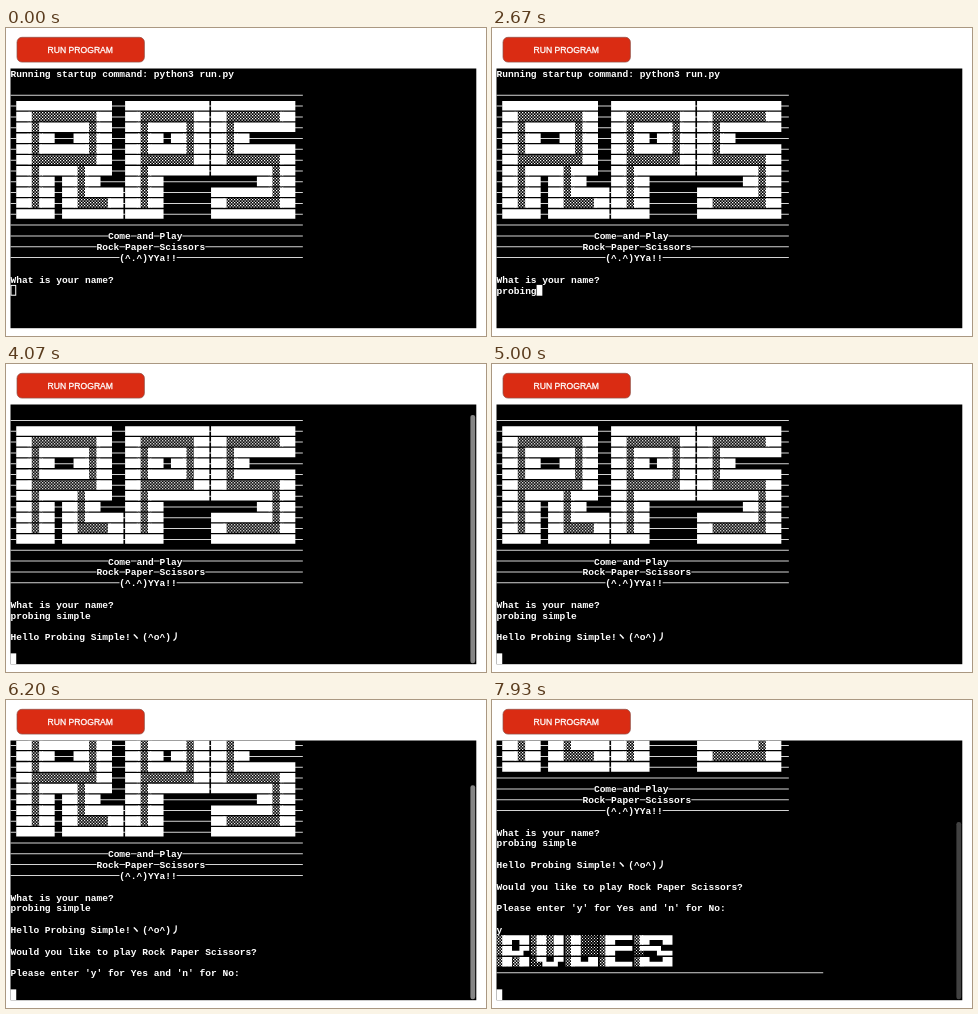
Write an HTML page that moves like this. It is 480 px wide and 308 px high and loops after 8 s.

```html
<!DOCTYPE html>
<html lang="en">
<head>
<meta charset="utf-8">
<title>Rock Paper Scissors terminal</title>
<style>
  html, body { margin: 0; width: 100%; height: 100%; overflow: hidden; background: #fff; }
  svg { display: block; width: 100vw; height: 100vh; }
  .mono { font: bold 9.55px "Liberation Mono", "DejaVu Sans Mono", monospace; fill: #fff; white-space: pre; }
  .kana { font: bold 9.6px "Noto Sans CJK JP", "Noto Sans CJK", sans-serif; fill: #fff; }
  .label { font: 8.6px "Liberation Sans", Arial, sans-serif; fill: #fff; stroke: #fff; stroke-width: .3; text-anchor: middle; }
</style>
</head>
<body>
<svg viewBox="0 0 480 308" preserveAspectRatio="none">
  <defs>
    <clipPath id="view"><rect x="4" y="40.5" width="466.3" height="260"/></clipPath>
    <pattern id="shade" width="3" height="3" patternUnits="userSpaceOnUse">
      <path d="M0 0h1.3v1.3h-1.3zM1.5 1.5h1.3v1.3h-1.3z" fill="#fff"/>
    </pattern>
    <pattern id="light" width="3" height="3" patternUnits="userSpaceOnUse">
      <path d="M0 0h1v1h-1zM1.5 1.5h1v1h-1z" fill="#fff"/>
    </pattern>
  </defs>
  <rect width="480" height="308" fill="#fff"/>
  <rect x="11" y="9.3" width="127.4" height="24.8" rx="5" fill="#da2c13" stroke="#8f5148" stroke-width=".7"/>
  <text class="label" x="74.3" y="24.8">RUN PROGRAM</text>
  <rect x="4.5" y="40.5" width="465.8" height="259.7" fill="#000"/>
  <g clip-path="url(#view)">
    <g id="screen"></g>
  </g>
  <rect id="thumb" x="464.4" width="4.8" rx="2.2" fill="#858585"/>
</svg>
<script>
const LOOP = 8000;
const LEFT = 4.5, TOP = 40.5, CELL_W = 5.73, CELL_H = 10.82, ROWS = 24;
const GLYPH_W = 9.8, GLYPH_H = 9.5; // block glyphs are wider than their cell
const NAME = "probing simple";
const KEY_TIMES = [1670, 1870, 2070, 2270, 2400, 2600, 2670, 2870, 3070, 3270, 3400, 3530, 3670, 3800];
const FOCUS = 800, YES = 7070;

// Each output burst: when, rows scrolled off, scrollbar fade start and end
const SCROLLS = [
  { at: 4070, off: 1, fade: [4510, 4800] },
  { at: 5070, off: 3, fade: [5570, 5740] },
  { at: 6200, off: 5, fade: [6700, 6930] },
  { at: 7330, off: 11, fade: [7830, 8030] }
];

const R = `
################
##%%%%%%%%%%%%##
##%%########%%##
##%%##----##%%##
##%%########%%##
##%%%%%%%%%%%%##
##%%######%%####
##%%##--##%%##
##%%##--##%%######
##%%##--##%%%%%%##
######--##########`;
const P = `
##############
##%%%%%%%%%%##
##%%######%%##
##%%##--##%%##
##%%######%%##
##%%%%%%%%%%##
##%%##########
##%%##
##%%##
##%%##
######`;
const S = `
##############
##%%%%%%%%%%##
##%%##########
##%%##
##%%##########
##%%%%%%%%%%##
##########%%##
--------##%%##
##########%%##
##%%%%%%%%%%##
##############`;
const RULES = [
  "▒█▀▀█ ▒█░▒█ ▒█░░░ ▒█▀▀▀ ▒█▀▀▀█",
  "▒█▄▄▀ ▒█░▒█ ▒█░░░ ▒█▀▀▀ ░▀▀▀▄▄",
  "▒█░▒█ ░▀▄▄▀ ▒█▄▄█ ▒█▄▄▄ ▒█▄▄▄█"
];

const screen = document.getElementById("screen");
const thumb = document.getElementById("thumb");
const bursts = [];

const colX = c => LEFT + c * CELL_W;
const rowY = r => TOP + r * CELL_H;

function add(parent, tag, attrs, text) {
  const node = document.createElementNS("http://www.w3.org/2000/svg", tag);
  for (const key in attrs) node.setAttribute(key, attrs[key]);
  if (text) node.textContent = text;
  return parent.appendChild(node);
}

function burst(at) {
  const node = add(screen, "g", {});
  bursts.push({ at, node });
  return node;
}

function write(parent, row, col, text, cls = "mono") {
  return add(parent, "text", { class: cls, x: colX(col), y: rowY(row) + 8.6 }, text);
}

const box = (x, y, w, h) => `M${x.toFixed(2)} ${y.toFixed(2)}h${w}v${h}h${-w}z`;

// Block characters and rules, gathered into one path per fill
function blocks(parent, firstRow, lines) {
  const half = GLYPH_H / 2;
  let solid = "", shade = "", light = "", dash = "";
  lines.forEach((line, i) => [...line].forEach((ch, c) => {
    const x = colX(c), y = rowY(firstRow + i);
    if (ch === "#" || ch === "█") solid += box(x, y, GLYPH_W, GLYPH_H);
    if (ch === "▀") solid += box(x, y, GLYPH_W, half);
    if (ch === "▄") solid += box(x, y + half, GLYPH_W, half);
    if (ch === "-") dash += box(x, y + 4.6, CELL_W + .1, 1);
    if (ch === "%" || ch === "▒") shade += box(x, y, GLYPH_W, GLYPH_H);
    if (ch === "░") light += box(x, y, GLYPH_W, GLYPH_H);
  }));
  add(parent, "path", { d: dash, fill: "#d4d4d4" });
  add(parent, "path", { d: light, fill: "url(#light)" });
  add(parent, "path", { d: shade, fill: "url(#shade)" });
  add(parent, "path", { d: solid, fill: "#fff" });
}

function caption(parent, row, col, text) {
  const mask = text.replace(/[^ ]/g, ".").replace(/ /g, "-");
  blocks(parent, row, ["-".repeat(col) + mask + "-".repeat(51 - col - text.length)]);
  write(parent, row, col, text);
}

const banner = burst(0);
const rule = "-".repeat(51);
const [r, p, s] = [R, P, S].map(letter => letter.trim().split("\n"));
const art = r.map((line, i) =>
  "-" + line.padEnd(18, "-") + "-" + p[i].padEnd(14, "-") + "-" + s[i].padEnd(14, "-") + "--");
write(banner, 0, 0, "Running startup command: python3 run.py");
blocks(banner, 2, [rule, ...art, rule]);
caption(banner, 15, 17, "Come and Play");
caption(banner, 16, 15, "Rock Paper Scissors");
caption(banner, 17, 19, "(^.^)YYa!!");
write(banner, 19, 0, "What is your name?");
const typed = write(banner, 20, 0, "");

const hello = burst(4070);
const title = NAME.replace(/\b\w/g, ch => ch.toUpperCase());
write(hello, 22, 0, `Hello ${title}!`);
write(hello, 22, 21, "ヽ", "kana");
write(hello, 22, 23, "(^o^)");
write(hello, 22, 28, "丿", "kana");
write(burst(5070), 24, 0, "Would you like to play Rock Paper Scissors?");
write(burst(6200), 26, 0, "Please enter 'y' for Yes and 'n' for No:");
write(burst(YES), 28, 0, "y");
blocks(burst(7330), 29, [...RULES, "-".repeat(57)]);

const cursor = add(screen, "rect", { stroke: "#fff" });

function placeCursor(t, row, col) {
  const hollow = t < FOCUS, inset = hollow ? .5 : 0;
  cursor.setAttribute("x", colX(col) + inset);
  cursor.setAttribute("y", rowY(row) + inset);
  cursor.setAttribute("width", CELL_W - 2 * inset);
  cursor.setAttribute("height", CELL_H - 2 * inset);
  cursor.setAttribute("fill", hollow ? "none" : "#fff");
  cursor.setAttribute("stroke-width", hollow ? 1 : 0);
}

function update(t) {
  const scroll = SCROLLS.filter(step => step.at <= t).pop();
  const off = scroll ? scroll.off : 0;
  const count = KEY_TIMES.filter(k => k <= t).length;

  screen.setAttribute("transform", `translate(0 ${-off * CELL_H})`);
  for (const { at, node } of bursts) node.setAttribute("visibility", t >= at ? "visible" : "hidden");
  typed.textContent = NAME.slice(0, count);

  if (!scroll) placeCursor(t, 20, count);
  else placeCursor(t, off + ROWS - 1, t >= YES && off === 5 ? 1 : 0);

  let alpha = 0;
  if (scroll) {
    const [from, to] = scroll.fade;
    alpha = Math.max(0, Math.min(1, (to - t) / (to - from)));
    const track = ROWS * CELL_H, total = ROWS + off;
    thumb.setAttribute("y", TOP + track * off / total);
    thumb.setAttribute("height", track * ROWS / total - 1);
  }
  thumb.setAttribute("opacity", alpha);
}

const start = performance.now();
function frame() {
  update((performance.now() - start) % LOOP);
  requestAnimationFrame(frame);
}
update(0);
requestAnimationFrame(frame);
</script>
</body>
</html>
```
